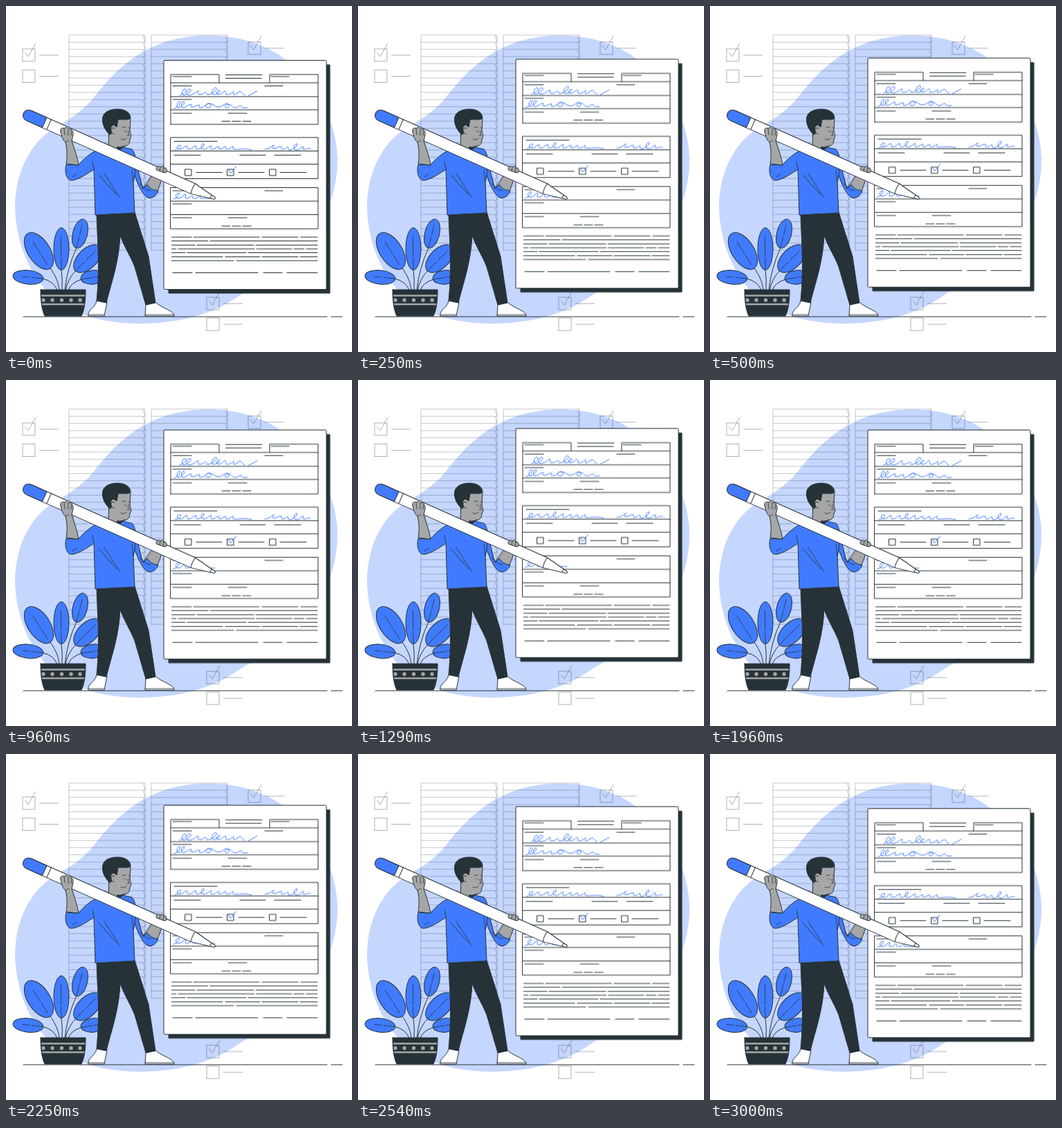
These frames come from a looping animation (500x500 px, 3040 ms). An HTML page:

```html
<!DOCTYPE html>
<html lang="en">
<head>
<meta charset="utf-8">
<title>Filling in a form</title>
<style>
  html, body { margin: 0; width: 100%; height: 100%; overflow: hidden; background: #fff; }
  svg { display: block; width: 100vw; height: 100vh; }
  .ink { fill: none; stroke: #263238; stroke-width: 1; stroke-linecap: round; stroke-linejoin: round; }
  .thin { stroke-width: .8; }
  .faint { fill: none; stroke: #263238; stroke-opacity: .3; }
  .ticks { stroke-opacity: .38; }
  .pen { fill: none; stroke: #407bff; stroke-width: 1; stroke-linecap: round; stroke-linejoin: round; }
  .blue { fill: #407bff; }
  .white { fill: #fff; }
  .skin { fill: #a6a6a6; }
  .dark { fill: #263238; }
  #paper { animation: float 3040ms linear -60ms infinite; }
  @keyframes float {
    0%, 100% { transform: translateY(.4px); }
    50% { transform: translateY(-9.6px); }
  }
</style>
</head>
<body>
<svg viewBox="0 0 500 500">
  <defs>
    <g id="box"><path d="M0 0h18v18h-18zM24 9h28"/></g>
    <path id="tick" d="M3 5l5 6 11-19"/>
    <path id="slat" d="M0 0H110M107 0L110 10.37"/>
  </defs>

  <path fill="#c5d6ff" d="M13 290C14 235 38 196 70 176C92 163 108 155 127 132C150 102 182 69 224 54C274 36 336 39 383 64C440 94 479 162 479 222C479 292 442 346 390 385C369 401 351 409 332 422C292 449 242 459 190 459C128 458 78 440 49 400C26 369 14 330 13 290Z"/>

  <g id="blinds" class="faint" stroke-width=".9">
    <path d="M91 42V353H201V42M210 42V353H320V42"/>
  </g>
  <g class="faint ticks">
    <use href="#box" x="24" y="62"/><use href="#tick" x="24" y="62"/>
    <use href="#box" x="24" y="92.5"/>
    <use href="#box" x="350" y="52"/><use href="#tick" x="350" y="52"/>
    <use href="#box" x="290" y="421"/><use href="#tick" x="290" y="421"/>
    <use href="#box" x="290" y="451"/>
  </g>
  <path class="ink" d="M25 449H464M470 449H486"/>

  <!-- plant -->
  <g class="ink">
    <path d="M60 374C70 386 76 398 77 411M80 381Q82 396 81 411M102 349Q88 380 85 411M102 381Q89 394 86 411M53 394Q70 398 74 411M109 395Q93 400 90 411"/>
    <g class="blue">
      <ellipse cx="126" cy="392" rx="18" ry="10" transform="rotate(-6 126 392)"/>
      <ellipse cx="118" cy="365" rx="14" ry="25" transform="rotate(45 118 365)"/>
      <ellipse cx="107" cy="329" rx="10.5" ry="21.5" transform="rotate(14 107 329)"/>
      <ellipse cx="47.500" cy="354" rx="16" ry="30" transform="rotate(-33 47.5 354)"/>
      <ellipse cx="80" cy="351" rx="11" ry="30.500"/>
      <ellipse cx="32" cy="392" rx="22" ry="10" transform="rotate(6 32 392)"/>
    </g>
    <path class="thin" stroke-dasharray="16 3 40" d="M60 374L39 341M80 381L79.500 333M102 349L110 317M102 381L129 354M53 394L24 391M109 395L134 391"/>
  </g>
  <path class="ink dark" d="M50 410H115C115 428 113 440 109 448H56C52 440 50 428 50 410Z"/>
  <path d="M51 418.500H114M52 431H113" stroke="#a6a6a6" stroke-width="2.500"/>
  <path d="M54 425h.01M67 425h.01M80.500 425h.01M94 425h.01M107 425h.01" stroke="#a6a6a6" stroke-width="5.400" stroke-linecap="round"/>

  <g id="paper">
    <rect class="dark" x="234.500" y="84.500" width="234" height="331" rx="1"/>
    <rect class="ink white" x="228" y="78.500" width="235" height="331" rx="1.500"/>
    <g class="ink">
      <path d="M238 171V99H308V111M381 111V99H451V171H238M238 111H451M238 131H451M238 150H451"/>
      <path d="M238 190H451V249.500H238ZM238 209.500H451M238 228.500H451"/>
      <path d="M238 262.500H451V322H238ZM238 282H451M238 301.500H451"/>
      <path d="M317.500 99.500H370M317.500 104.500H369M241 102H268M383 102H409M241 115.500H268M374 115.500H400M241 135H268M241 155H268M321 155H348M312 166.500h12m3 0h12m3 0h12"/>
      <path d="M243 195.500H305M243 215.500H281M338 215.500H375M388 215.500H426M275 240.500H312M336 240.500H373M396 240.500H434"/>
      <path d="M259 236h9v9h-9zM320 236h9v9h-9zM381 236h9v9h-9z"/>
      <path d="M241 267H268M374 267H400M241 286H268M241 306H268M321 306H348M312 318h12m3 0h12m3 0h12"/>
      <path d="M239.500 334H268M271 334H366M370 334H422M426 334H450M239.500 339.500H292M295 339.500H450M239.500 345.500H273M276 345.500H358M361 345.500H450M239.500 351H246M249 351H359M362 351H413M416 351H431M434 351H450M239.500 356.500H259M262 356.500H347M350 356.500H450M239.500 362.500H313M317 362.500H367M370 362.500H422M425 362.500H450M239.500 368H329M333 368H450M241 385.500H269M274 385.500H364M372 385.500H399M406 385.500H450"/>
    </g>
    <g class="pen">
      <path d="M251 129c6-1 12-8 8-9s-7 9-2 9c6-1 13-8 9-9s-8 9-2 9c7 0 10-5 13-6s-3 6 4 5c6-1 6-4 8-3s-1 4 4 3c9-2 14-10 10-10s-9 11-2 10c6-1 10-6 7-6s-6 6 0 6c5-1 7-6 9-5s-2 6 4 5c5-1 6-4 8-4s-4 5 2 4l6-4c4-2 4 4 8 5M363 123l-13 7"/>
      <path d="M243 148c6-1 11-9 8-10s-6 9-2 9c6-1 11-9 8-9s-6 9-1 9c6-1 8-5 11-5s-3 4 2 4 7-3 10-3-2 4 2 4c8-1 7-6 12-6s4 6-1 6-4-6 2-6 7 5 13 5 8-5 12-5 4 6 0 6-4-5 2-5 5 5 10 5 5-3 8-3-2 4 10 3"/>
      <path d="M244 208c7-1 11-7 7-7s-6 6 0 6c6 0 7-5 10-5s-2 5 3 5 7-5 10-5-2 5 3 5c8-1 11-8 8-8s-5 8 1 8 7-5 10-5-3 5 2 5 6-4 9-4-2 4 2 4 6-4 8-4-2 4 3 4 6-4 8-4-3 4 2 4c9 1 12-2 25 1"/>
      <path d="M374 207c8 0 11-6 13-6s-5 5 0 5 6-3 10-3-2 4 3 4 4-3 7-3-2 4 3 4c8-1 13-9 10-9s-7 9 0 9 6-5 9-5-3 4 2 4 4-2 9-1"/>
      <path d="M242 279c7-1 10-9 7-9s-6 8 0 8c6 0 7-6 10-6s-3 6 2 6 6-4 8-4-2 4 3 4 5-3 8-3-2 3 3 3h19"/>
      <path d="M321.500 237l3 5 8-10"/>
    </g>
  </g>

  <!-- legs and shoes -->
  <g class="ink">
    <path class="white" d="M131 426C129 437 117 439 119 448H142L146 428Z"/>
    <path class="white" d="M202 431L201 448H243C243 440 225 437 216 428Z"/>
    <path class="thin" d="M119 446H142M201 446H243"/>
    <path class="dark" d="M131 301C132 340 136 374 131 426L145 429C152 400 163 372 165 332C171 348 181 364 186 377L202 432L216 429L206 362L186 298Z"/>
  </g>

  <!-- head and body -->
  <g class="ink">
    <path class="skin" d="M149 178L148 205C154 216 166 214 169 203C176 203 179 199 179 193L181 188L179 181L180 163L160 164Z"/>
    <path class="dark" stroke="none" d="M160 203C165 204 169 203 173 201L165 209Q160 208 160 203Z"/>
    <path class="dark" d="M148 184C141 177 138 167 140 160C142 153 150 149 161 149C172 149 180 154 180 162C175 166 170 163 162 164L160 175L156 172C151 172 150 180 153 184L149 186Z"/>
    <path class="skin" d="M157 177C151 173 150 184 156 185"/>
    <path class="thin" d="M168 176q3-2 5-1M177 176h2M166 192q4 3 8-1M176 181l2 6h-3"/>
    <path class="thin" stroke-width="2" d="M172 180v1.500M178 180v1"/>
    <path class="skin" d="M199 262L214 240L227 246L218 270L205 272Z"/>
    <path class="blue" d="M184 238C188 253 195 269 203 276C211 281 219 272 220 267C213 267 207 263 204 258L198 264L189 230Z"/>
    <path class="blue" d="M148 203C142 206 136 207 128 210C117 216 109 225 104 230L87 229C84 241 88 253 96 252C107 250 118 242 127 236L129 302L186 299L184 255C188 239 190 214 182 207L168 204C165 211 154 212 148 203Z"/>
    <path class="thin" d="M134 244L160 273M142 242L164 276M184 255L182 236M193 256Q200 266 209 267M127 236L125 225M102 243L96 247"/>
  </g>

  <!-- pencil -->
  <g class="ink" transform="translate(31 157.500) rotate(24)">
    <path class="white" d="M2-8H262L296-1.500Q298 0 296 1.500L262 8H2Z"/>
    <path class="blue" d="M27-8H2C-9-8-9 8 2 8H27Z"/>
    <path d="M34-8V8M262-8Q260 0 262 8M290-2.500V2.500"/>
  </g>

  <!-- hands -->
  <g class="ink">
    <path class="skin" d="M79 181C78 177 81 175 84 177C86 174 89 176 90 178C92 176 95 177 95 180C97 180 97 183 97 186L95 195C99 207 103 218 105 230L87 228C89 215 88 204 86 197C82 194 80 188 79 181Z"/>
    <path class="thin" d="M84 177l1 9M90 178v9M95 180l-1 7M86 197l5-3"/>
    <path class="skin" d="M217 236C217 231 221 230 223 233C224 230 228 231 228 235C230 232 233 235 232 240L229 241L218 237Z"/>
    <path class="thin" d="M223 233l-1 5M228 235l-1 5"/>
  </g>
</svg>
<script>
  // Rows of slats for both window blinds.
  const blinds = document.getElementById('blinds');
  for (const x of [91, 210]) {
    for (let row = 0; row < 30; row++) {
      const slat = document.createElementNS('http://www.w3.org/2000/svg', 'use');
      slat.setAttribute('href', '#slat');
      slat.setAttribute('x', x);
      slat.setAttribute('y', 42 + row * 311 / 30);
      blinds.append(slat);
    }
  }
</script>
</body>
</html>
```
